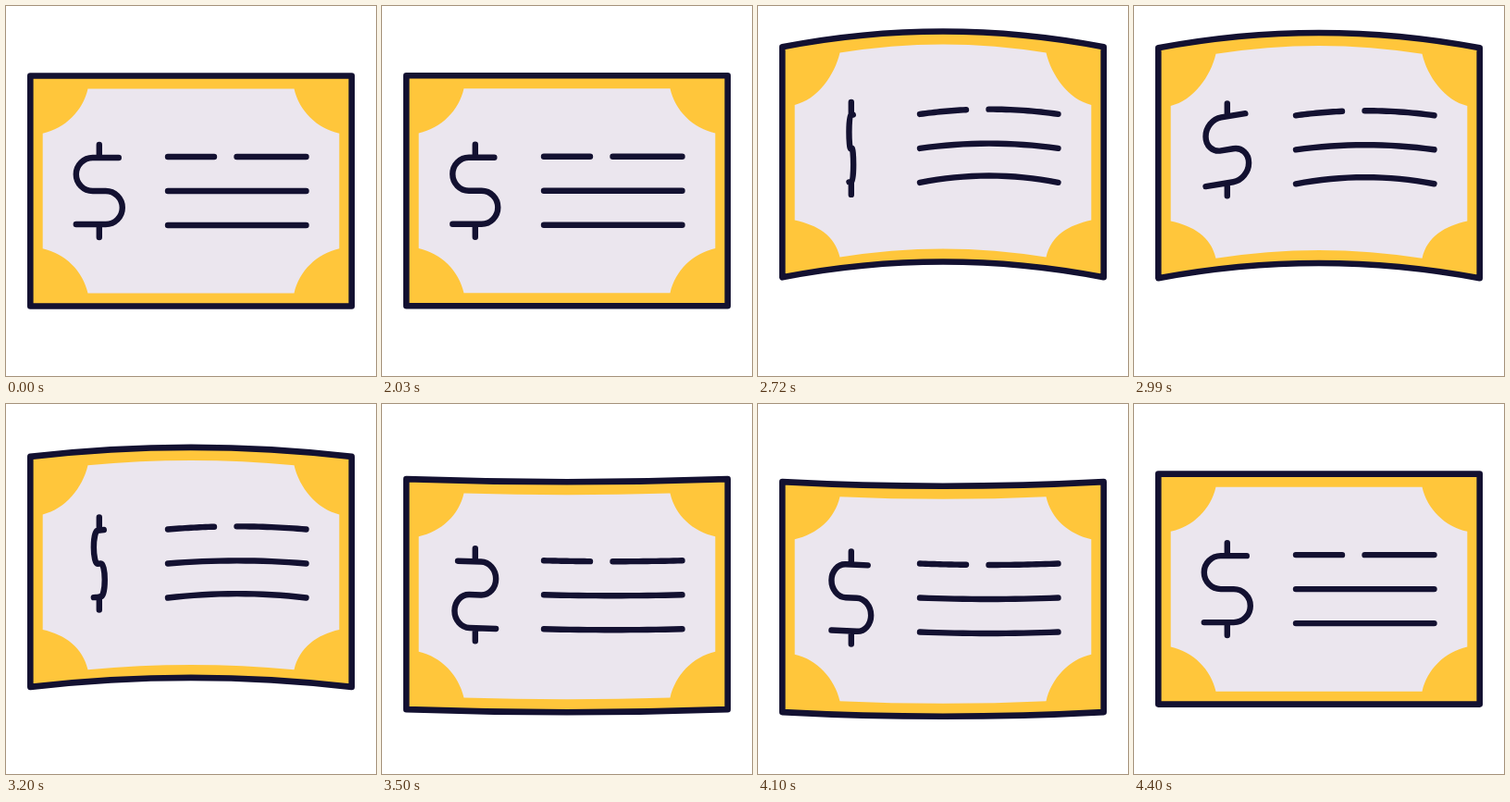
An HTML page with a canvas that plays this animation: 400 px wide and 400 px high, repeating every 4.43 s.

```html
<!DOCTYPE html>
<html lang="en">
<head>
<meta charset="utf-8">
<title>Waving banknote</title>
<style>
  html, body { margin: 0; width: 100%; height: 100%; overflow: hidden; background: #fff; }
  canvas { display: block; width: 400px; height: 400px; }
</style>
</head>
<body>
<canvas id="stage"></canvas>
<script>
const LOOP = 4430, REST = 2030, STEP = 30;
const NAVY = '#131131', YELLOW = '#ffc63b', PAPER = '#ebe6ee';

// [time, value] pairs, eased in and out between neighbours
const LIFT = [[2000, 0], [2660, -48], [2920, -48], [3735, 23], [3830, 23], [4430, 0]];
const SPIN = [[2000, 1], [2500, -1], [2914, 1], [3595, -1], [4200, 1]];

// Drawn around its own centre
const dollar = new Path2D(
  'M0-50V-36M21-36H-7A18 18 0 0 0-7 0H7A18 18 0 0 1 7 36H-25M0 36V50');

const canvas = document.getElementById('stage');
const ctx = canvas.getContext('2d');
const ratio = window.devicePixelRatio || 1;
canvas.width = canvas.height = 400 * ratio;
ctx.scale(ratio, ratio);
ctx.lineCap = ctx.lineJoin = 'round';

function valueAt(keys, t) {
  if (t <= keys[0][0]) return keys[0][1];
  for (let i = 1; i < keys.length; i++) {
    const [t0, a] = keys[i - 1], [t1, b] = keys[i];
    if (t < t1) {
      const u = (t - t0) / (t1 - t0);
      return a + (b - a) * u * u * (3 - 2 * u);
    }
  }
  return keys[keys.length - 1][1];
}

function stroke(path, width) {
  ctx.strokeStyle = NAVY;
  ctx.lineWidth = width;
  ctx.stroke(path);
}

function cardPath(lift) {
  const side = 0.65 * lift, control = 2 * lift - side;
  return new Path2D(`M26.3 ${75.5 + side}Q200 ${75.5 + control} 373.7 ${75.5 + side}
    V${324.5 + side}Q200 ${324.5 + control} 26.3 ${324.5 + side}Z`);
}

function panelPath(lift) {
  const side = 0.64 * lift, edge = 0.81 * lift, control = 2 * lift - edge;
  const [top, bottom] = [89.5 + edge, 310.5 + edge];
  const [upper, lower] = [137.7 + side, 262.3 + side];
  return new Path2D(`M88.5 ${top}Q200 ${89.5 + control} 311.5 ${top}
    C317 ${top + 24} 336 ${upper - 5.4} 360.3 ${upper}V${lower}
    C336 ${lower + 5.4} 317 ${bottom - 24} 311.5 ${bottom}
    Q200 ${310.5 + control} 88.5 ${bottom}
    C83 ${bottom - 24} 64 ${lower + 5.4} 39.7 ${lower}V${upper}
    C64 ${upper - 5.4} 83 ${top + 24} 88.5 ${top}Z`);
}

function textLine(x0, x1, y, bend) {
  const path = new Path2D();
  for (let i = 0; i <= 16; i++) {
    const x = x0 + (x1 - x0) * i / 16;
    path.lineTo(x, y + bend * (1 - ((x - 250) / 75) ** 2));
  }
  stroke(path, 6.4);
}

function draw(t) {
  const lift = valueAt(LIFT, t), spin = valueAt(SPIN, t);
  const shift = lift * (lift < 0 ? 0.96 : 0.72);
  const bend = lift * 0.11;

  ctx.fillStyle = '#fff';
  ctx.fillRect(0, 0, 400, 400);

  const card = cardPath(lift);
  ctx.fillStyle = YELLOW;
  ctx.fill(card);
  ctx.fillStyle = PAPER;
  ctx.fill(panelPath(lift));
  stroke(card, 6.6);

  textLine(175, 225, 163 + shift, bend);
  textLine(249.5, 324.5, 163 + shift, bend);
  textLine(175, 324.5, 200 + shift, bend);
  textLine(175, 324.5, 237 + shift, lift < 0 ? bend * 1.4 : bend);

  const sign = new Path2D();
  const tilt = 0.0035 * lift * spin;
  sign.addPath(dollar, new DOMMatrix([spin, tilt, 0, 1, 100.8, 200 + shift]));
  stroke(sign, 6.4);
}

const start = performance.now();
function tick() {
  const t = (performance.now() - start) % LOOP;
  draw(t < REST ? 0 : REST + Math.floor((t - REST) / STEP) * STEP);
  requestAnimationFrame(tick);
}
tick();
</script>
</body>
</html>
```
